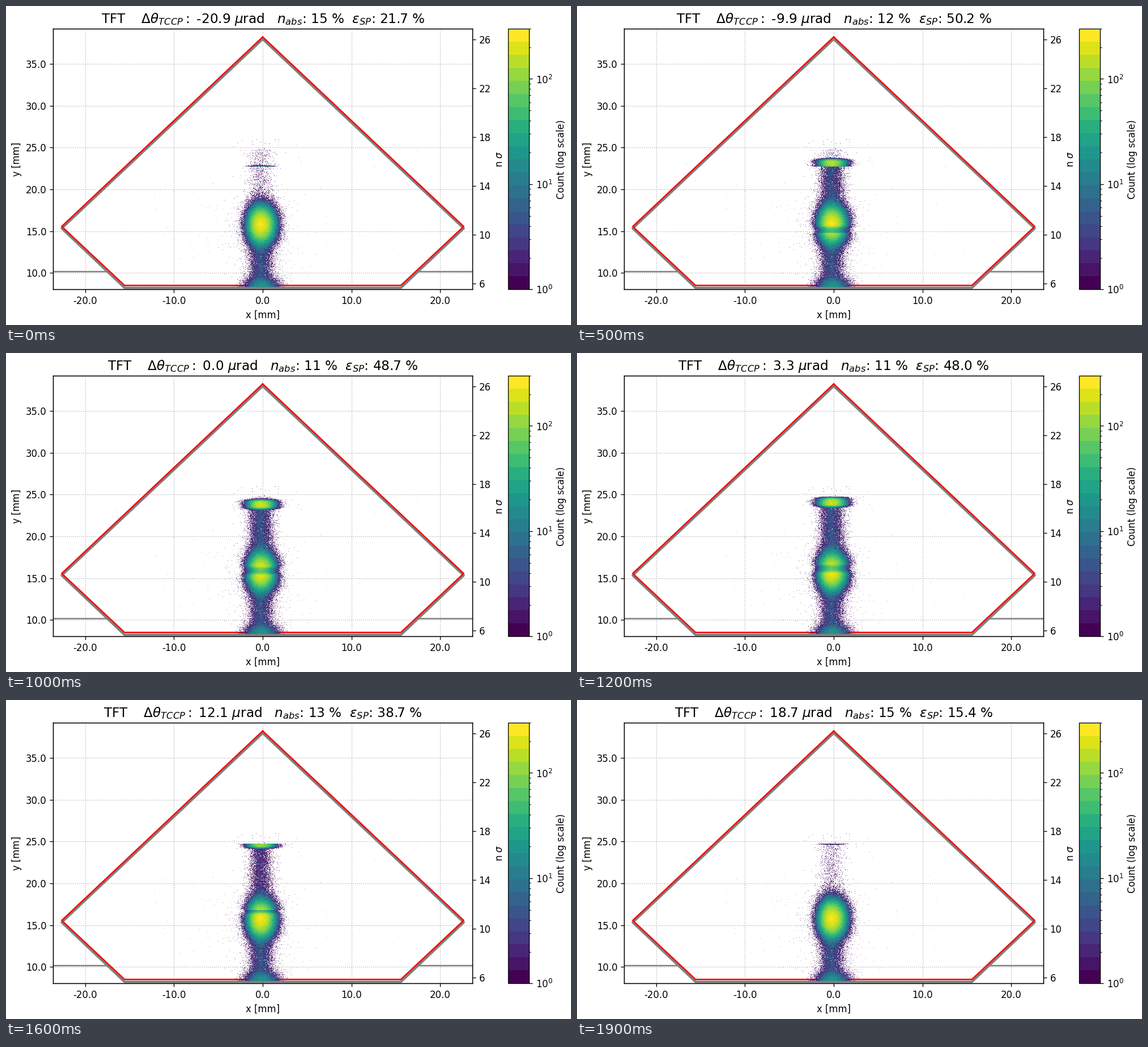
These frames come from a looping animation (997 by 562 pixels, 2000 ms). A matplotlib script:

```python
import numpy as np
import matplotlib.pyplot as plt
from matplotlib.animation import FuncAnimation
from matplotlib.cm import ScalarMappable
from matplotlib.colors import LogNorm

W, H, DPI = 997, 562, 119
LEFT, TOP, RIGHT, BOTTOM = 83, 40, 823, 499.4
XLIM, YLIM, SIGMA_LIM = (-23.63, 23.63), (8.026, 39.193), (5.53, 26.907)

# Title values per step: the angle scan has one extra point at zero.
ANGLES = np.insert(-20.9 + 2.2 * np.arange(19), 10, 0.0)
N_ABS = [15, 15, 14, 13, 13, 12, 12, 11, 11, 11,
         11, 11, 11, 12, 12, 12, 13, 14, 14, 15]
EPS = [21.7, 30.4, 38.6, 44.9, 48.9, 50.2, 49.5, 48.6, 48.4, 48.5,
       48.7, 48.6, 48.0, 46.9, 45.1, 42.4, 38.7, 32.6, 24.3, 15.4]

plt.rcParams["font.family"] = "DejaVu Sans"
rng = np.random.default_rng(7)
cmap = plt.get_cmap("viridis", 20)
norm = LogNorm(1, 300)

# Histogram grid in stage pixels.
X = np.arange(LEFT, RIGHT)[None, :] + 0.5
Y = np.arange(TOP, BOTTOM)[:, None] + 0.5
DX = X - 449
SHAPE = (Y.size, X.size)
CRYSTAL = (371, 401)   # rows of the beam that meet the crystal
SHIFT = 117            # upward deflection of channelled particles
RATE = 1.17            # pixels per microradian


def gauss(d, s):
    return np.exp(-0.5 * (d / s) ** 2)


def between(lo, hi):
    return (Y >= lo) & (Y < hi)


def scatter(n, x, y):
    counts = np.zeros(SHAPE, int)
    keep = (x > LEFT + 50) & (x < RIGHT - 60) & (y > 234) & (y < 495)
    np.add.at(counts, (y[keep].astype(int) - TOP, x[keep].astype(int) - LEFT), 1)
    return counts


core = 240 * gauss(DX, np.where(DX < 0, 10.3, 11.4)) * gauss(Y - 386, 15.3)
halo = 1.1 * gauss(DX - 1, 17) * gauss(Y - 386, 20)
beam = rng.poisson(core + halo)

tail = (4.5 * gauss(DX, 9.5) + 0.4 * gauss(DX, 15)) * (Y > 398)
flare = 17 * gauss(DX - 2, 14.8) * gauss(Y - 497, 9)
mist = 0.33 * gauss(DX, 11) * between(254, 350)
static = rng.poisson((tail + flare + mist) * (Y < 496))
static += scatter(190, rng.laplace(453, 80, 190), rng.normal(395, 65, 190))
static += scatter(220, rng.normal(452, 32, 220), rng.normal(400, 48, 220))
static += scatter(14, rng.normal(450, 20, 14), rng.uniform(236, 256, 14))

column = rng.poisson((4.2 * gauss(DX, 9) + 0.4 * gauss(DX, 14)) * between(254, 385))
u_beam, u_column = rng.random((2, *SHAPE))

# Single counts are lighter, most of all far from the beam.
fade = rng.uniform(0.35, 1, SHAPE) * (0.35 + 0.65 * gauss(DX, 38))


def efficiency(angle):
    d = np.abs(Y - 384.5 + RATE * angle)
    return 0.72 * np.exp(-(d / 7) ** 4) * between(*CRYSTAL)


FULL = efficiency(0).sum()


def thin(counts, share, u):
    return np.floor(counts * share + u).astype(int) * (counts > 0)


def histogram(angle):
    eff = efficiency(angle)
    bent = thin(beam, eff, u_beam) * (eff > 0)
    start = np.clip(267.5 - RATE * angle, 254, 284)
    lost = thin(column, eff.sum() / FULL, u_column) * (Y > start)
    return static + beam - bent + np.roll(bent, -SHIFT, axis=0) + lost


def to_rgba(counts):
    rgba = cmap(norm(np.maximum(counts, 1)))
    rgba[..., 3] = np.where(counts == 0, 0, np.where(counts == 1, fade, 1))
    return rgba


def title(i):
    return (rf"TFT    $\Delta\theta_{{TCCP}}:$ {ANGLES[i]:.1f} $\mu$rad   "
            rf"$n_{{abs}}$: {N_ABS[i]} %  $\varepsilon_{{SP}}$: {EPS[i]:.1f} %")


def box(x0, y0, x1, y1):
    return [x0 / W, 1 - y1 / H, (x1 - x0) / W, (y1 - y0) / H]


fig = plt.figure(figsize=((W + 1e-6) / DPI, (H + 1e-6) / DPI), dpi=DPI, facecolor="white")
ax = fig.add_axes(box(LEFT, TOP, RIGHT, BOTTOM))
image = ax.imshow(np.zeros((*SHAPE, 4)), extent=(*XLIM, *YLIM), aspect="auto",
                  interpolation="nearest", zorder=3)


def aperture(apex, side, base, **style):
    ax.plot([0, 22.65, 15.57, -15.57, -22.65, 0],
            [apex, side, base, base, side, apex], **style)


for x0, x1 in ((XLIM[0], -17.4), (17.4, XLIM[1])):
    ax.plot([x0, x1], [10.15, 10.15], color="gray", lw=1.5)
aperture(37.95, 15.33, 8.22, color="gray", lw=2.5)
aperture(38.21, 15.56, 8.51, color="red", lw=1.5)

xticks, yticks = range(-20, 21, 10), range(10, 36, 5)
ax.set_xticks(xticks, [f"{v:.1f}" for v in xticks])
ax.set_yticks(yticks, [f"{v:.1f}" for v in yticks])
ax.set(xlim=XLIM, ylim=YLIM, xlabel="x [mm]", ylabel="y [mm]")
ax.grid(ls=":")
heading = ax.set_title("", fontsize=14)

right = ax.twinx()
right.set(ylim=SIGMA_LIM, yticks=range(6, 27, 4), ylabel=r"n $\sigma$")

cax = fig.add_axes(box(886, TOP, 923, BOTTOM))
fig.colorbar(ScalarMappable(norm, cmap), cax=cax, label="Count (log scale)")


def draw(i):
    image.set_data(to_rgba(histogram(ANGLES[i])))
    heading.set_text(title(i))
    return image, heading


anim = FuncAnimation(fig, draw, frames=len(ANGLES), interval=100,
                     repeat=True, repeat_delay=0, blit=False)
plt.show()
```
